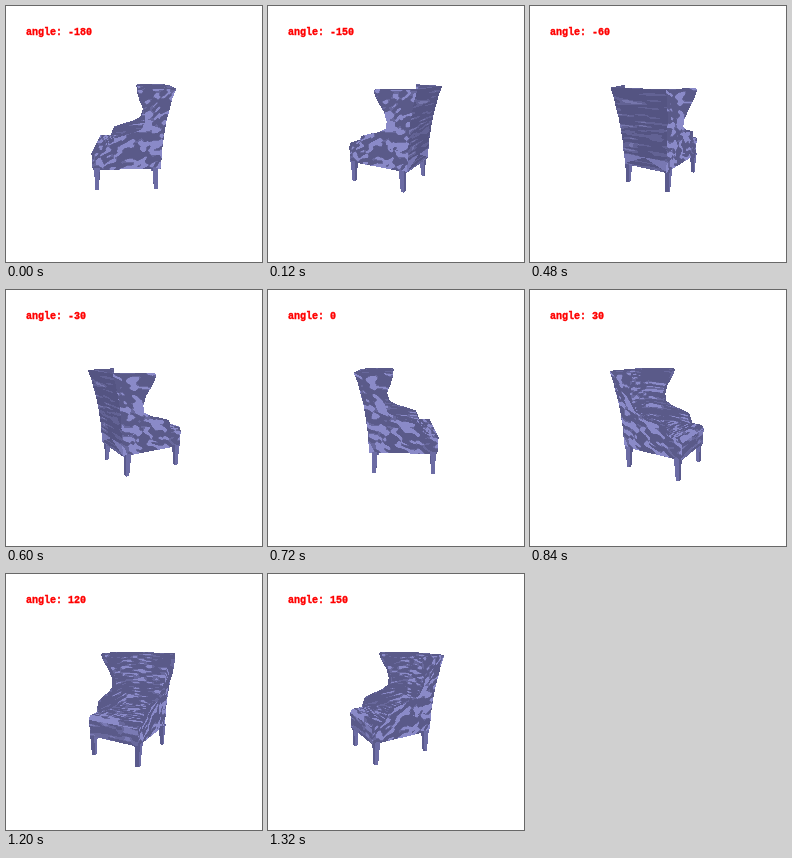
Write an HTML page with a canvas that moves like this. It is 256x256 px and loops after 1.44 s.

```html
<!DOCTYPE html>
<html lang="en">
<head>
<meta charset="utf-8">
<title>Turntable chair</title>
<style>
  html, body { margin: 0; width: 100%; height: 100%; overflow: hidden; background: #fff; }
  canvas { position: absolute; left: 0; top: 0; width: 256px; height: 256px; }
  #label {
    position: absolute; left: 20px; top: 21px; white-space: pre;
    font: bold 10px/12px "Liberation Mono", "DejaVu Sans Mono", monospace; color: #f00;
    -webkit-text-stroke: 0.35px #f00;
  }
</style>
</head>
<body>
<canvas id="stage" width="256" height="256"></canvas>
<div id="label">angle: -180</div>
<script>
const SIZE = 256, STEPS = 12, HOLD = 120;
const DIST = 264, TILT = 0.245;
const COS = Math.cos(TILT), SIN = Math.sin(TILT);
const ctx = document.getElementById('stage').getContext('2d');
const label = document.getElementById('label');

// Shell levels: height, back depth, back half width, front depth, front half width
const levels = [
  [47, -36, 28, -3, 40],
  [45, -35.5, 28, -2.4, 41],
  [38, -33, 27.5, -4.5, 39.5],
  [28, -31, 27, -9, 36],
  [19, -29, 26, -9.5, 32.5],
  [12, -28, 25.5, -7, 30.5],
  [7.5, -27.5, 25, 2, 29.5],
  [4.5, -27, 25, 13, 29],
  [1.5, -27, 24.5, 22, 28],
  [-8, -26, 24, 26, 27],
  [-8.5, -26, 24, 37, 26.5],
  [-12, -26, 24, 39, 26],
  [-28, -25, 23, 38.5, 26]
];

// Smooth value noise
function hash(x, y) {
  let h = Math.imul(x, 374761393) + Math.imul(y, 668265263) | 0;
  h = Math.imul(h ^ h >>> 13, 1274126177);
  return ((h ^ h >>> 16) >>> 0) / 4294967296;
}
function noise(x, y) {
  const i = Math.floor(x), j = Math.floor(y);
  const ease = t => t * t * (3 - 2 * t);
  const u = ease(x - i), v = ease(y - j);
  const a = hash(i, j) * (1 - u) + hash(i + 1, j) * u;
  const b = hash(i, j + 1) * (1 - u) + hash(i + 1, j + 1) * u;
  return a * (1 - v) + b * v;
}

const DARK = [90, 90, 137], DEEP = [84, 84, 130], MID = [104, 104, 156], LIGHT = [138, 138, 200];

// Surface colours by position: x forward, y up, z sideways
const skin = {
  side(x, y, z) {
    const s = z > 0 ? 0 : 40;
    const warp = 1.4 * noise(x / 8 + s, y / 8);
    const n = noise((x - y * 0.7) / 7 + warp + s, (y + x * 0.6) / 3.4 + warp);
    return n > 0.58 ? LIGHT : n > 0.48 ? MID : DARK;
  },
  back(x, y, z) {
    if (y < -17 && Math.abs(z) / 23 > (-17 - y) / 10) return [120, 120, 178];
    const n = noise(z / 14 + 7, y / 1.7);
    return n > 0.85 ? [118, 118, 172] : n > 0.55 ? [98, 98, 148] : DEEP;
  },
  inner(x, y, z) {
    const n = noise((z + x * 0.8) / 8 + 20, (y + x * 0.15) / 1.5);
    return n > 0.72 ? LIGHT : n > 0.55 ? MID : DARK;
  },
  seat(x, y, z) {
    const n = noise(z / 9 + 60, x / 1.8);
    return n > 0.6 ? LIGHT : n > 0.45 ? MID : DARK;
  },
  front(x, y, z) {
    const n = noise(z / 8 + 90, y / 2.4);
    return n > 0.72 ? [122, 122, 180] : n > 0.5 ? MID : DARK;
  },
  edge(x, y, z) {
    return noise((x + z) / 6, y / 3) > 0.55 ? MID : DARK;
  },
  leg: () => [108, 108, 164],
  legSide: () => [90, 90, 140]
};

const quads = [];
const quad = (kind, ...p) => quads.push({ paint: skin[kind], p });

function buildShell() {
  const outBack = (i, s) => [levels[i][1], levels[i][0], s * levels[i][2]];
  const outFront = (i, s) => [levels[i][3], levels[i][0], s * levels[i][4]];
  const inBack = (i, s) => [levels[i][1] + 6, levels[i][0], s * (levels[i][2] - 4)];
  const inFront = (i, s) => [levels[i][3] - 1, levels[i][0], s * (levels[i][4] - 4)];
  const strip = (kind, a, b, i, s, t = s) =>
    quad(kind, a(i, s), b(i, t), b(i + 1, t), a(i + 1, s));

  for (let i = 0; i < levels.length - 1; i++) {
    for (const s of [-1, 1]) {
      strip('side', outBack, outFront, i, s);
      strip('inner', inBack, inFront, i, s);
      strip(levels[i][0] < 0 ? 'seat' : 'edge', outFront, inFront, i, s);
    }
    strip('back', outBack, outBack, i, -1, 1);
    strip('inner', inBack, inBack, i, -1, 1);
  }
  for (const s of [-1, 1]) quad('edge', outBack(0, s), outFront(0, s), inFront(0, s), inBack(0, s));
  quad('edge', outBack(0, -1), outBack(0, 1), inBack(0, 1), inBack(0, -1));
}

function buildSeat() {
  const span = (kind, x0, y0, x1, y1, w) =>
    quad(kind, [x0, y0, -w], [x0, y0, w], [x1, y1, w], [x1, y1, -w]);
  span('seat', -21, -8, 37, -8, 25.5);
  span('seat', 37, -8, 39, -12, 26);
  span('front', 39, -12, 38.5, -28, 26);
}

function buildLeg(x, z, lean) {
  const ring = (y, r, dx) =>
    [[-r, -r], [r, -r], [r, r], [-r, r]].map(c => [x + dx + c[0], y, z + c[1]]);
  const rings = [ring(-26, 2.8, 0), ring(-38, 2, lean * 0.3), ring(-48, 1.7, lean)];
  for (let k = 0; k < 2; k++) {
    for (let i = 0; i < 4; i++) {
      const j = (i + 1) % 4;
      quad(i % 2 ? 'legSide' : 'leg', rings[k][i], rings[k][j], rings[k + 1][j], rings[k + 1][i]);
    }
  }
}

function project([x, y, z], ca, sa) {
  const across = x * ca - z * sa, near = x * sa + z * ca;
  const q = 1 / (DIST - near * COS - y * SIN);
  return {
    sx: 128 + DIST * q * across,
    sy: 128 + DIST * q * (near * SIN - y * COS),
    q, x: x * q, y: y * q, z: z * q
  };
}

function fill(a, b, c, paint, img, depth) {
  const area = (b.sx - a.sx) * (c.sy - a.sy) - (c.sx - a.sx) * (b.sy - a.sy);
  if (Math.abs(area) < 1e-6) return;
  const low = k => Math.max(0, Math.floor(Math.min(a[k], b[k], c[k])));
  const high = k => Math.min(SIZE - 1, Math.ceil(Math.max(a[k], b[k], c[k])));
  const x1 = high('sx'), y1 = high('sy'), x0 = low('sx');
  for (let py = low('sy'); py <= y1; py++) {
    for (let px = x0; px <= x1; px++) {
      const x = px + 0.5, y = py + 0.5;
      const v = ((x - a.sx) * (c.sy - a.sy) - (c.sx - a.sx) * (y - a.sy)) / area;
      const w = ((b.sx - a.sx) * (y - a.sy) - (x - a.sx) * (b.sy - a.sy)) / area;
      const u = 1 - v - w;
      if (u < 0 || v < 0 || w < 0) continue;
      const mix = k => a[k] * u + b[k] * v + c[k] * w;
      const q = mix('q'), at = py * SIZE + px;
      if (q <= depth[at]) continue;
      depth[at] = q;
      img.data.set(paint(mix('x') / q, mix('y') / q, mix('z') / q), at * 4);
    }
  }
}

function render(angle) {
  const img = ctx.createImageData(SIZE, SIZE);
  img.data.fill(255);
  const depth = new Float32Array(SIZE * SIZE);
  const rad = angle * Math.PI / 180, ca = Math.cos(rad), sa = Math.sin(rad);
  for (const { paint, p } of quads) {
    const [a, b, c, d] = p.map(v => project(v, ca, sa));
    fill(a, b, c, paint, img, depth);
    fill(a, c, d, paint, img, depth);
  }
  return img;
}

buildShell();
buildSeat();
for (const s of [-1, 1]) {
  buildLeg(34.5, s * 24.5, 0.8);
  buildLeg(-20, s * 22.5, -0.8);
}

const angleAt = step => -180 + step * 360 / STEPS;
const views = Array.from({ length: STEPS }, (_, i) => render(angleAt(i)));
let shown = -1;

function tick(now) {
  const step = Math.floor(now / HOLD) % STEPS;
  if (step !== shown) {
    shown = step;
    ctx.putImageData(views[step], 0, 0);
    label.textContent = 'angle: ' + angleAt(step);
  }
  requestAnimationFrame(tick);
}
tick(performance.now());
</script>
</body>
</html>
```
